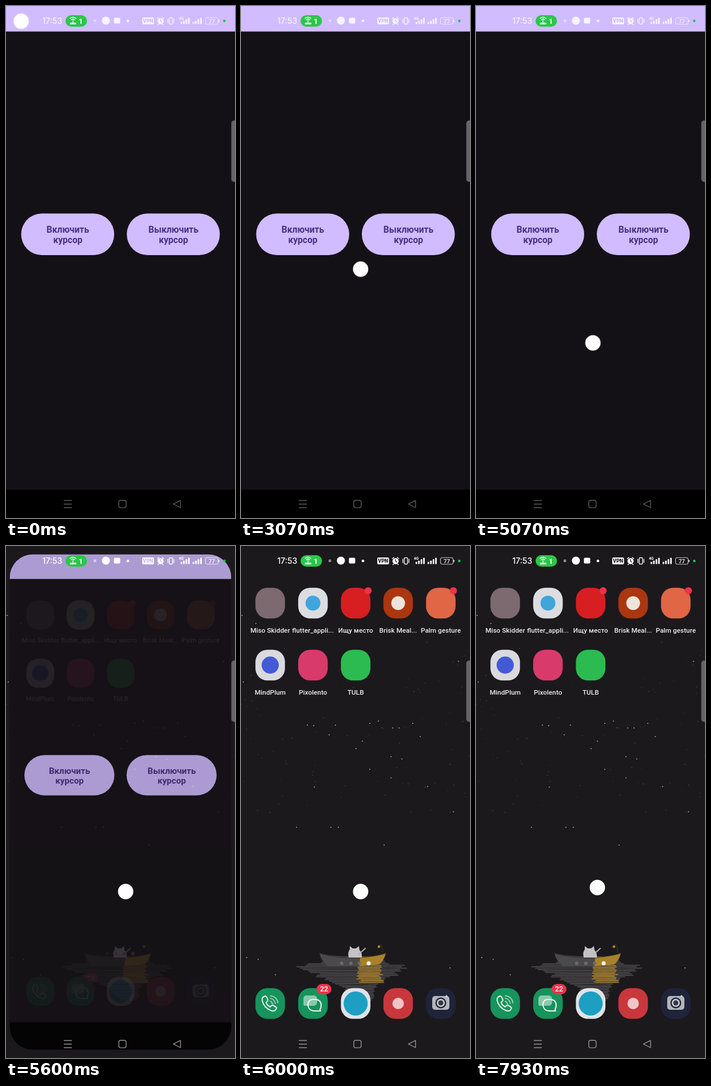
These frames come from a looping animation (400 px wide and 892 px high, 8 s). An HTML page:

```html
<!DOCTYPE html>
<html lang="ru">
<head>
<meta charset="utf-8">
<title>Cursor</title>
<style>
html, body { margin: 0; width: 100%; height: 100%; overflow: hidden; background: #1b191c; }
#stage { position: relative; width: 400px; height: 892px; overflow: hidden; font-family: Roboto, sans-serif; }
#stage > *, #app svg { position: absolute; left: 0; top: 0; width: 400px; height: 892px; }
text { text-anchor: middle; }
#app { overflow: hidden; background: #141116; }
#app, #icons { transform-origin: 200px 446px; }
#app text { font-size: 15.6px; font-weight: 600; fill: #4a2f86; }
.label { font-size: 11.8px; font-weight: 500; fill: #efedf0; }
.line { fill: none; stroke-linecap: round; stroke-linejoin: round; }
#app, #icons, #status, #nav, #cursor, .hole, .cut { animation: 8s linear infinite; }
#app { animation-name: leave; }
#icons { animation-name: arrive; }
#status { animation-name: brighten; }
#nav { animation-name: navTone; }
#cursor { animation-name: roam; }
.hole { animation-name: holeFill; }
.cut { animation-name: holeStroke; }
@keyframes leave {
  0%, 67.5% { transform: scale(1); opacity: 1; border-radius: 0; }
  68.4% { border-radius: 40px; }
  70% { transform: scale(.968); opacity: .81; border-radius: 42px; }
  73.5%, 100% { transform: scale(.9); opacity: 0; border-radius: 46px; }
}
@keyframes arrive {
  0%, 67.5% { transform: scale(.92); opacity: .15; }
  70% { transform: scale(.94); opacity: .42; }
  74.5%, 100% { transform: scale(1); opacity: 1; }
}
@keyframes brighten { 0%, 67.5% { opacity: .84; } 70%, 100% { opacity: 1; } }
@keyframes navTone { 0%, 67.5% { stroke: #5b5b5b; } 70%, 100% { stroke: #929193; } }
@keyframes holeFill { 0%, 70% { fill: #cbb8f6; } 73.5%, 100% { fill: #1b191c; } }
@keyframes holeStroke { 0%, 70% { stroke: #cbb8f6; } 73.5%, 100% { stroke: #1b191c; } }
@keyframes roam {
  0%, 24.99% { transform: translate(26.5px, 26.5px); }
  25%, 35% { transform: translate(208.5px, 418.5px); }
  39.2%, 41% { transform: translate(209px, 468px); }
  45% { transform: translate(211px, 560px); }
  48.5% { transform: translate(214px, 608px); }
  52.5% { transform: translate(213px, 585px); }
  57% { transform: translate(209px, 577px); }
  62.5% { transform: translate(206px, 583px); }
  65%, 67% { transform: translate(201px, 594px); }
  69%, 78% { transform: translate(209px, 602px); }
  84% { transform: translate(207px, 584px); }
  86.6% { transform: translate(207px, 581px); }
  94.2%, 95.5% { transform: translate(210px, 590px); }
  99%, 100% { transform: translate(212px, 595px); }
}
</style>
</head>
<body>
<div id="stage">
  <svg viewBox="0 0 400 892">
    <g id="stars" fill="#c9c8cb"></g>
    <g id="water" class="line" stroke-width="1.9"></g>
    <path d="M137 709Q160 716 208 715L207 732H152Q140 724 137 709Z" fill="#4a494b"/>
    <path d="M208 715Q236 716 253 709Q250 723 241 729L207 732Z" fill="#a98228"/>
    <path class="line" d="M138 710Q195 725 252 710" stroke="#2b292b"/>
    <path d="M188 717Q186 707 190 703L190 697L195 701H201L206 697L207 704Q212 709 211 717Z" fill="#c4c2c5"/>
    <path class="line" d="M205 712L217 701" stroke="#b5b3b6" stroke-width="2"/>
    <circle cx="241" cy="698" r="2.4" fill="#a98228"/>
    <path class="line" d="M243 693Q248 698 247 708" stroke="#3b3837"/>
  </svg>

  <svg id="icons" viewBox="0 0 400 892">
    <g id="tiles"></g>
    <g fill="#f0314a">
      <circle cx="222" cy="78" r="6.2"/><circle cx="371" cy="78" r="6.2"/>
      <rect x="132" y="763" width="26" height="18" rx="9"/>
    </g>
    <text x="145" y="776.4" font-size="12.5" font-weight="500" fill="#fff">22</text>
    <g class="line" stroke="#e6f5ec" stroke-width="2">
      <path d="M42 784Q36 786 37 792Q40 805 54 810Q60 811 62 805Q62 803 55 800Q53 800 51 803Q45 800 44 795Q47 793 47 791Q45 784 42 784Z"/>
      <path d="M51 793Q54 794 55 798M51 788Q58 789 60 797M51 783.5Q63 785 64.5 796" stroke-width="1.7" opacity=".7"/>
    </g>
    <path d="M114 783H128Q133 784 133 790V795Q132 801 126 801H111Q109 801 109 798V789Q109 784 114 783Z" fill="#8cc9ab"/>
    <path class="line" d="M124 790H131Q140 791 140 800Q140 805 138 807L139 810H127Q118 809 117 800Q117 791 124 790Z" stroke="#eef8f2" stroke-width="2"/>
    <rect x="334" y="784" width="30" height="24" rx="5" fill="#b4b5bb"/>
    <circle cx="349" cy="796" r="9.5" fill="#232738"/>
    <circle cx="349" cy="796" r="7" fill="#d0d1d5"/>
    <circle cx="349" cy="796" r="4.5" fill="#343847"/>
    <circle cx="359" cy="784" r="1.6" fill="#d6d6da"/>
    <g fill="#6f6c70">
      <circle cx="176" cy="727" r="3"/><circle cx="192" cy="727" r="3"/><circle cx="207" cy="727" r="3"/>
    </g>
    <circle cx="223" cy="727" r="3.5" fill="#fff"/>
  </svg>

  <div id="app">
    <svg viewBox="0 0 400 892">
      <rect width="400" height="44.5" fill="#d0bcff"/>
      <rect y="842.5" width="400" height="50" fill="#000"/>
      <g fill="#d0bcff">
        <rect x="26.5" y="361.5" width="162.5" height="72.5" rx="36.2"/>
        <rect x="211" y="361.5" width="162.5" height="72.5" rx="36.2"/>
      </g>
      <text x="108" y="395">Включить</text><text x="108" y="413">курсор</text>
      <text x="292.5" y="395">Выключить</text><text x="292.5" y="413">курсор</text>
    </svg>
  </div>

  <svg viewBox="0 0 400 892">
    <rect x="393.5" y="199.5" width="14" height="107" rx="5" fill="#656366"/>
    <rect x="104" y="16" width="37.5" height="20" rx="10" fill="#2bc748"/>
    <g class="line" stroke="#fff" stroke-width="1.4">
      <path d="M112 21.5Q117 17.5 122 21.5M114 24Q117 21.5 120 24M117 25V28"/>
      <path d="M113 30.5H121.5" stroke-width="3"/>
    </g>
    <text x="130.5" y="30.7" font-size="13.5" font-weight="600" fill="#fff">1</text>
    <g id="status" fill="#fff">
      <text x="80.8" y="31" font-size="14" font-weight="500" style="font-family:Inter,sans-serif">17:53</text>
      <rect x="153" y="23.5" width="4.5" height="4.5" rx="1" opacity=".5"/>
      <circle cx="174.5" cy="25.5" r="7"/>
      <rect x="188.5" y="20.5" width="11" height="10" rx="2"/>
      <circle cx="213" cy="26" r="2.3"/>
      <rect x="238" y="20" width="20.5" height="12" rx="2"/>
      <text class="hole" x="248.2" y="29.4" font-size="8.8" font-weight="800">VPN</text>
      <circle cx="270" cy="26.3" r="5.4"/>
      <path class="line" d="M264.5 22L267 20M275.5 22L273 20M266.5 31.5L265.5 32.5M273.5 31.5L274.5 32.5" stroke="#fff" stroke-width="1.5"/>
      <path class="line cut" d="M270 23.5V26.5L272 28" stroke-width="1.2"/>
      <g class="line" stroke="#fff" stroke-width="1.3">
        <rect x="285.2" y="20.5" width="5.6" height="11" rx="1.3"/>
        <path d="M282.7 23V29M293.3 23V29"/>
      </g>
      <text x="306" y="23.6" font-size="6.5" font-weight="700">4G</text>
      <g id="bars"></g>
      <rect class="line" x="348.5" y="20.3" width="22" height="11.4" rx="3.2" stroke="#fff" stroke-opacity=".75" stroke-width="1.1"/>
      <rect x="371.3" y="24" width="1.4" height="4" rx=".7"/>
      <text x="359.5" y="29.6" font-size="9.5" font-weight="500">77</text>
    </g>
    <circle cx="381.3" cy="26" r="2.2" fill="#25c64e"/>
    <g id="nav" class="line" stroke-width="1.4">
      <path d="M101.5 861.5H114.5M101.5 867.7H114.5M101.5 874H114.5"/>
      <rect x="197" y="861.3" width="12.8" height="12.8" rx="3"/>
      <path d="M292.5 867.6L304.8 861.3V874Z"/>
    </g>
    <circle id="cursor" r="13.4" fill="#fff"/>
  </svg>
</div>
<script>
const SVG = 'http://www.w3.org/2000/svg';
function add(parent, tag, attrs, text) {
  const node = document.createElementNS(SVG, tag);
  for (const key in attrs) node.setAttribute(key, attrs[key]);
  if (text) node.textContent = text;
  document.getElementById(parent).append(node);
}
let seed = 41;
const random = () => (seed = (seed * 16807) % 2147483647) / 2147483647;

// Wallpaper: the bright stars are placed, the faint ones scattered.
const brightStars = [
  [380, 201], [225, 389], [97, 490], [157, 490], [170, 490], [371, 463], [262, 404], [250, 521],
  [265, 317], [300, 309], [326, 419], [212, 340], [281, 371], [225, 309], [240, 305], [165, 312],
  [127, 313], [116, 312], [154, 329], [201, 353], [276, 317], [313, 332], [262, 367], [128, 420],
  [26, 135], [2, 121], [4, 237], [10, 717], [60, 747], [365, 735], [30, 720]];
for (const [cx, cy] of brightStars) add('stars', 'circle', { cx, cy, r: 1.1, opacity: .7 });
for (let i = 0; i < 90; i++) {
  add('stars', 'circle', {
    cx: 400 * random(), cy: 150 + 320 * random(), r: .8, opacity: .12 + .25 * random()
  });
}

// Reflection: rows of strokes whose width follows the outline of the water.
const outline = [[722, 55], [734, 106], [748, 76], [766, 34], [793, 15]];
function halfWidth(y) {
  const i = outline.findIndex(([bottom]) => y <= bottom) || 1;
  const [y0, w0] = outline[i - 1], [y1, w1] = outline[i];
  return w0 + (w1 - w0) * (y - y0) / (y1 - y0);
}
function ripple(center, half, y, stroke) {
  const left = center - half * (.75 + .25 * random());
  const right = center + half * (.75 + .25 * random());
  add('water', 'path', { d: `M${left} ${y}Q${center} ${y + 3 * random() - 1.5} ${right} ${y}`, stroke });
}
for (let y = 723; y < 793; y += 2.5) ripple(193 + (y - 723) * .3, halfWidth(y), y, '#454346');
for (let y = 731; y < 762; y += 2.6) ripple(225 + 6 * random() - 3, 22, y, '#a07b29');

// App tiles: column, vertical centre, tile colour, label, colour of the plain disc, its radius.
const columns = [51, 125.7, 200.3, 274.5, 349];
const apps = [
  [0, 99.5, '#7d6a70', 'Miso Skidder'],
  [1, 99.5, '#dcdde1', 'flutter_appli...', '#3fa5dc', 13],
  [2, 99.5, '#d71f22', 'Ищу место'],
  [3, 99.5, '#ab3610', 'Brisk Meal...', '#eee3dd', 12],
  [4, 99.5, '#e06645', 'Palm gesture'],
  [0, 207.5, '#d9d9de', 'MindPlum', '#4459d6', 15],
  [1, 207.5, '#d83a6c', 'Pixolento'],
  [2, 207.5, '#2cbb50', 'TULB'],
  [0, 797, '#17935c'],
  [1, 797, '#17935c'],
  [2, 797, '#dfe3e6', '', '#1d9fc4', 21],
  [3, 797, '#c8373c', '', '#efc5c6', 10],
  [4, 797, '#20243a']];
for (const [column, cy, fill, label, disc, r] of apps) {
  const cx = columns[column];
  add('tiles', 'rect', { x: cx - 25.8, y: cy - 26.8, width: 51.6, height: 53.6, rx: 21, fill });
  if (disc) add('tiles', 'circle', { cx, cy, r, fill: disc });
  if (label) add('tiles', 'text', { x: cx, y: cy + 51.3, class: 'label' }, label);
}

for (const start of [305, 326]) {
  [4, 6, 8.5, 11].forEach((height, i) =>
    add('bars', 'rect', { x: start + i * 4.4, y: 31.5 - height, width: 2.7, height, rx: .8 }));
}
</script>
</body>
</html>
```
